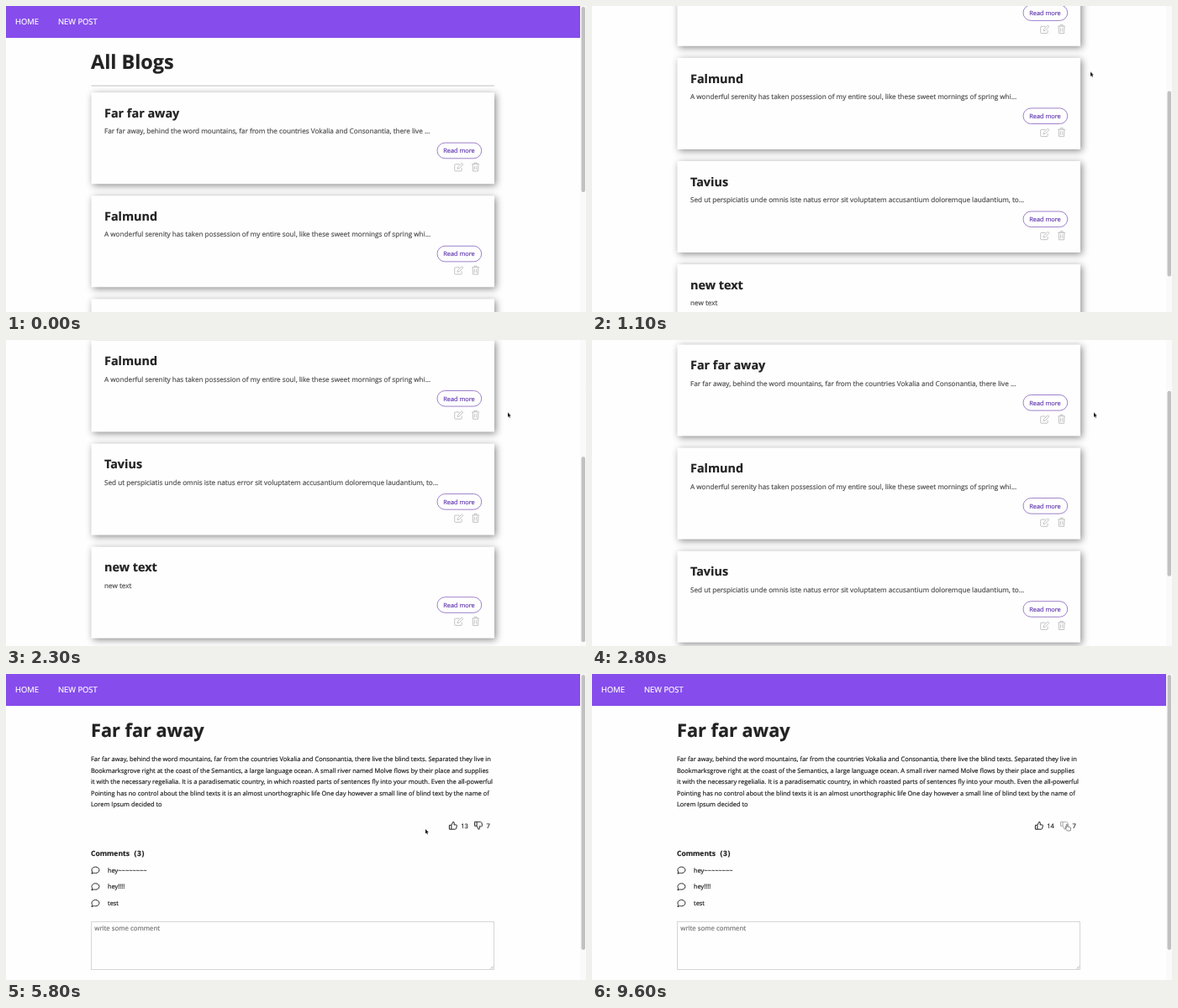
Animation, 690 px wide and 365 px high, one loop 9900 ms. Source, as an HTML page:

```html
<!DOCTYPE html>
<html lang="en">
<head>
<meta charset="utf-8">
<title>Blog</title>
<style>
@property --y { syntax: "<number>"; inherits: true; initial-value: 0; }
@property --hand { syntax: "<number>"; inherits: true; initial-value: 0; }

html, body { margin: 0; width: 100%; height: 100%; overflow: hidden; background: #fefefe; }
svg { display: block; width: 100vw; height: 100vh; }
text {
  --ink: #222;
  font-family: "Open Sans", "Noto Sans", sans-serif;
  font-size: 7.46px;
  fill: var(--ink);
  stroke: var(--ink);
  stroke-width: .2px;
  text-rendering: geometricPrecision;
  white-space: pre;
}

.bar { fill: #864cec; }
.nav text { --ink: #fff; font-size: 9.4px; }
text.title { font-size: 23.4px; font-weight: 700; }
text.post-title { font-size: 21.7px; font-weight: 700; }
.card { fill: #fefefe; filter: drop-shadow(2.5px 2.5px 4px rgba(0, 0, 0, .45)); }
text.head { font-size: 14.4px; font-weight: 700; }
text.lead { --ink: #505050; font-size: 8.16px; }
.more { fill: var(--face, #fefefe); stroke: var(--edge, #8663bd); stroke-width: .8; }
text.label { --ink: var(--word, #643bb0); font-size: 7.35px; text-anchor: middle; }
.tools { fill: none; stroke: #b4b4b4; stroke-width: .8; stroke-linejoin: round; }
.icon { fill: none; stroke: #222; stroke-width: 1; stroke-linejoin: round; }
text.sub { font-size: 8.5px; font-weight: 700; }
text.hint { --ink: #757575; font-size: 7.85px; }
.field { fill: #fefefe; stroke: #d6d6d6; }
.thumb { fill: #c1c1c1; }

/* Every animation shares one loop and moves in hard steps. */
.list, .post, .hover, .like, .dislike, .before, .after, .cursor {
  animation: 9.9s step-end infinite;
}
.list { animation-name: scroll, leave; }
.post { animation-name: enter; }
.hover { --face: #864cec; --edge: #864cec; --word: #fff; animation-name: hover; }
.like { animation-name: like; }
.dislike { animation-name: dislike; }
.before { animation-name: before; }
.after { animation-name: after; }
.cursor { animation-name: cursor; }
.page { transform: translateY(calc(var(--y) * -1px)); }
.list .thumb { transform: translateY(calc(var(--y) * .612px)); }
.arrow { opacity: calc(1 - var(--hand)); }
.hand { opacity: var(--hand); }

@keyframes scroll {
  0% { --y: 0; }
  7.07% { --y: 14; }
  8.08% { --y: 50; }
  9.09% { --y: 94; }
  10.1% { --y: 133; }
  11.11% { --y: 164.4; }
  12.12% { --y: 187; }
  13.13% { --y: 203; }
  14.14% { --y: 214; }
  15.15% { --y: 221; }
  16.16% { --y: 225.8; }
  26.26% { --y: 196; }
  27.27% { --y: 143; }
  28.28% { --y: 97.7; }
  29.29% { --y: 74; }
  31.31% { --y: 62; }
  32.32% { --y: 44; }
  33.33% { --y: 28; }
  34.34% { --y: 17; }
  35.35%, 100% { --y: 12.7; }
}
@keyframes leave { 0% { visibility: visible; } 46.46%, 100% { visibility: hidden; } }
@keyframes enter { 0% { visibility: hidden; } 46.46%, 100% { visibility: visible; } }
@keyframes hover { 0% { opacity: 0; } 37.37%, 100% { opacity: 1; } }
@keyframes like { 0% { opacity: 1; } 64.64% { opacity: .5; } 93.93%, 100% { opacity: 1; } }
@keyframes dislike { 0% { opacity: 1; } 95.95%, 100% { opacity: .4; } }
@keyframes before { 0% { opacity: 1; } 77.77%, 100% { opacity: 0; } }
@keyframes after { 0% { opacity: 0; } 77.77%, 100% { opacity: 1; } }
@keyframes cursor {
  0% { opacity: 0; --hand: 0; transform: translate(593px, 78.5px); }
  3.03% { opacity: 1; --hand: 0; transform: translate(593px, 78.5px); }
  23.23% { --hand: 0; transform: translate(597px, 86.5px); }
  31.31% { --hand: 0; transform: translate(592px, 95px); }
  32.32% { --hand: 0; transform: translate(580px, 112px); }
  33.33% { --hand: 0; transform: translate(565px, 132px); }
  34.34% { --hand: 0; transform: translate(551px, 147px); }
  35.35% { --hand: 0; transform: translate(540px, 153.5px); }
  37.37% { --hand: 1; transform: translate(540px, 153.5px); }
  46.46% { --hand: 0; transform: translate(540px, 153.5px); }
  54.54% { --hand: 0; transform: translate(533px, 163px); }
  55.55% { --hand: 0; transform: translate(518px, 174px); }
  56.56% { --hand: 0; transform: translate(505px, 182px); }
  58.58% { --hand: 0; transform: translate(499px, 185px); }
  59.59% { --hand: 0; transform: translate(500px, 186px); }
  60.6% { --hand: 0; transform: translate(503px, 187px); }
  61.61% { --hand: 0; transform: translate(509px, 188px); }
  62.62% { --hand: 0; transform: translate(516px, 187px); }
  63.63% { --hand: 0; transform: translate(523px, 185px); }
  64.64% { --hand: 1; transform: translate(528px, 182px); }
  65.65% { --hand: 1; transform: translate(531px, 180px); }
  86.86% { --hand: 1; transform: translate(533px, 180.5px); }
  87.87% { --hand: 1; transform: translate(535px, 181px); }
  93.93% { --hand: 0; transform: translate(545px, 182px); }
  94.94% { --hand: 0; transform: translate(555px, 181.5px); }
  95.95% { --hand: 1; transform: translate(562px, 180px); }
  96.96%, 100% { opacity: 1; --hand: 1; transform: translate(565px, 179px); }
}
</style>
</head>
<body>
<svg viewBox="0 0 690 365">
  <defs>
    <g id="nav" class="nav">
      <rect class="bar" width="683" height="38"/>
      <text x="11" y="22">HOME</text>
      <text x="62" y="22">NEW POST</text>
    </g>
    <g id="button">
      <rect class="more" x="513" y="60" width="52.7" height="18.6" rx="9.3"/>
      <text class="label" x="539" y="72.1">Read more</text>
    </g>
    <g id="card">
      <rect class="card" x="101.5" width="479.5" height="109"/>
      <use href="#button"/>
      <g class="tools">
        <path d="M539.5 85.5h-5q-.8 0-.8.8v6.6q0 .8.8.8h6.800q.8 0 .8-.8v-3"/>
        <path d="M537 91l.4-2 4.900-4.700 1.600 1.500-4.900 4.800z"/>
        <path d="M554.3 85.4h8.6M557 85.2v-1.4h3.2v1.4M555.2 85.6l.4 8.2h6l.4-8.2M557.4 87.4v4.6M559.8 87.4v4.6"/>
      </g>
    </g>
    <path id="vote" d="M3.1 4.5L5 .6q1.7 0 1.5 1.7l-.3 1.8h2.4q1.2 0 1 1.2l-.8 3.1q-.3 1-1.2 1H.6V4.5h2.5v4.9"/>
    <path id="bubble" d="M.6 8.8l.8-2.100C-.6 3.500 2 .7 5.100.7c2.600 0 4.500 1.600 4.500 3.700S7.700 8.100 5.100 8.100q-1 0-1.900-.3z"/>
    <rect id="track" x="683" width="7" height="365" fill="#fafafa"/>
  </defs>

  <rect width="690" height="365" fill="#fefefe"/>

  <g class="list">
    <g class="page">
      <use href="#nav"/>
      <text class="title" x="101" y="74.5">All Blogs</text>
      <rect x="101.5" y="94.6" width="479.5" height="1" fill="#c2c2c6"/>
      <g transform="translate(0 103.2)">
        <use href="#card"/>
        <g class="hover"><use href="#button"/></g>
        <text class="head" x="117" y="29.8">Far far away</text>
        <text class="lead" x="117" y="49.2">Far far away, behind the word mountains, far from the countries Vokalia and Consonantia, there live ...</text>
      </g>
      <g transform="translate(0 226.3)">
        <use href="#card"/>
        <text class="head" x="117" y="29.8">Falmund</text>
        <text class="lead" x="117" y="49.2">A wonderful serenity has taken possession of my entire soul, like these sweet mornings of spring whi...</text>
      </g>
      <g transform="translate(0 349.4)">
        <use href="#card"/>
        <text class="head" x="117" y="29.8">Tavius</text>
        <text class="lead" x="117" y="49.2">Sed ut perspiciatis unde omnis iste natus error sit voluptatem accusantium doloremque laudantium, to...</text>
      </g>
      <g transform="translate(0 472.5)">
        <use href="#card"/>
        <text class="head" x="117" y="29.8">new text</text>
        <text class="lead" x="117" y="49.2">new text</text>
      </g>
    </g>
    <use href="#track"/>
    <rect class="thumb" x="684.5" y="1" width="4.5" height="221" rx="2"/>
  </g>

  <g class="post">
    <use href="#nav"/>
    <text class="post-title" x="101" y="74.5">Far far away</text>
    <text x="101" y="104.2">Far far away, behind the word mountains, far from the countries Vokalia and Consonantia, there live the blind texts. Separated they live in</text>
    <text x="101" y="117.7">Bookmarksgrove right at the coast of the Semantics, a large language ocean. A small river named Molve flows by their place and supplies</text>
    <text x="101" y="131.1">it with the necessary regelialia. It is a paradisematic country, in which roasted parts of sentences fly into your mouth. Even the all-powerful</text>
    <text x="101" y="144.6">Pointing has no control about the blind texts it is an almost unorthographic life One day however a small line of blind text by the name of</text>
    <text x="101" y="158">Lorem Ipsum decided to</text>

    <g class="like"><use class="icon" href="#vote" x="526.8" y="175.8"/></g>
    <text class="before" x="541.3" y="184">13</text>
    <text class="after" x="541.3" y="184">14</text>
    <g class="dislike"><use class="icon" href="#vote" transform="translate(557 185.8) scale(1 -1)"/></g>
    <text x="571.5" y="184">7</text>

    <text class="sub" x="101" y="217">Comments</text>
    <text class="sub" x="152.5" y="217" letter-spacing=".6">(3)</text>
    <use class="icon" href="#bubble" x="101.3" y="229.4"/>
    <text x="121" y="236.7">hey~~~~~~~~</text>
    <use class="icon" href="#bubble" x="101.3" y="249.1"/>
    <text x="121" y="256.4">hey!!!!</text>
    <use class="icon" href="#bubble" x="101.3" y="268.8"/>
    <text x="121" y="276">test</text>

    <rect class="field" x="101.5" y="295.5" width="479" height="57"/>
    <text class="hint" x="105.3" y="306.2">write some comment</text>
    <path d="M576.5 351.5l3-3M578.5 351.5l1-1" stroke="#999" stroke-width=".7"/>
    <use href="#track"/>
    <rect class="thumb" x="684.5" y="1" width="4.5" height="328" rx="2"/>
  </g>

  <g class="cursor">
    <path class="arrow" d="M0 0v5.4l1.2-1.1.9 2 .9-.4-.9-1.9h1.7z" fill="#111" stroke="#fff" stroke-width=".7" paint-order="stroke"/>
    <path class="hand" d="M-.7.5q.7-.9 1.4 0v2.7l3 .6q1 .2.9 1.2l-.5 3H.3L-2 5q-.2-.9.7-.7l.6.5z" fill="#fff" stroke="#444" stroke-width=".6" stroke-linejoin="round"/>
  </g>
</svg>
</body>
</html>
```
